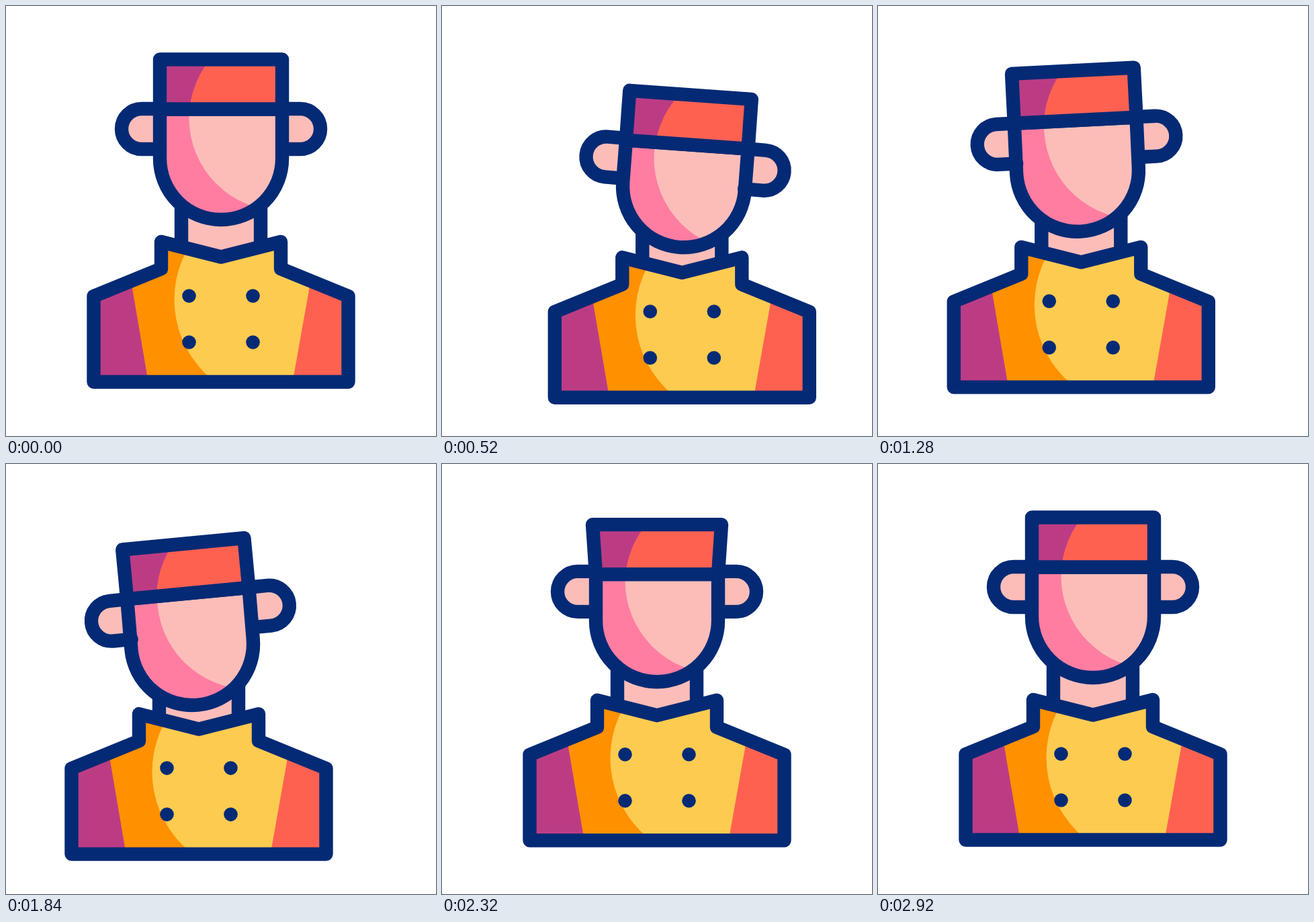
Recreate the animation shown at these times as an HTML page with a canvas. Size 640 px wide and 640 px high, loop 3000 ms.

```html
<!DOCTYPE html>
<html lang="en">
<head>
<meta charset="utf-8">
<title>Bellhop sway</title>
<style>
  html, body { margin: 0; width: 100%; height: 100%; overflow: hidden; background: #fff; }
  canvas { display: block; width: 100vmin; height: 100vmin; }
</style>
</head>
<body>
<canvas id="stage" width="640" height="640"></canvas>
<script>
const ctx = document.getElementById('stage').getContext('2d');
const LOOP = 3000, STEP = 40, MID = 320;
const NAVY = '#042a75', PURPLE = '#bc3c84', CORAL = '#ff6151', SKIN = '#fcbdb8',
      PINK = '#ff7da1', ORANGE = '#ff9000', YELLOW = '#fdcb50';

const easeOut = (t, power) => 1 - (1 - t) ** power;
const smooth = t => t * t * (3 - 2 * t);
const progress = (time, start, end) => Math.min(1, Math.max(0, (time - start) / (end - start)));

// Full lean to either side: tilt in degrees, sink = head drop, press = ears and hat lagging
const RIGHT = { x: 37.3, tilt: 4.1, shift: 0, sink: 18, press: 10.3 };
const LEFT = { x: -36.5, tilt: -6, shift: -7, sink: 22, press: -2 };

function poseAt(time) {
  const right = easeOut(progress(time, 120, 520), 1.5) - progress(time, 720, 1080);
  const left = easeOut(progress(time, 1080, 1640), 1.5) - progress(time, 1800, 2220);
  const bounce = 1.33 * (easeOut(progress(time, 2220, 2420), 2) - smooth(progress(time, 2420, 2920)));

  const side = time < 1080 ? RIGHT : LEFT;
  const lean = time < 1080 ? right : left;
  const crossing = time > 720 && time < 1640;      // the body swings low across the middle
  const body = { x: side.x * lean, y: 23.3 * lean ** (crossing ? 1.5 : 1) + 0.7 * bounce };
  const tilt = side.tilt * lean, press = side.press * lean;
  const headY = body.y + side.sink * lean ** (crossing ? 1.1 : 1);

  // Parts higher above the neck swing further out
  const part = (height, y, angle) => ({
    x: MID + body.x + side.shift * lean + height * Math.sin(tilt * Math.PI / 180),
    y: y + headY,
    angle: angle * Math.PI / 180
  });
  return {
    body,
    face: part(38, 227 + 5.5 * bounce, tilt),
    ears: part(66, 183 + press + 6.2 * bounce, tilt + 0.08 * press),
    hat: part(104, 153.5 + 1.1 * press + 10 * bounce, tilt),
    flare: 5 * bounce
  };
}

function polygon(...points) {
  const path = new Path2D();
  points.forEach(([x, y]) => path.lineTo(x, y));
  path.closePath();
  return path;
}

// Closes a left half with its reflection about the vertical line at axis
const mirrored = (axis, ...half) =>
  polygon(...half, ...half.map(([x, y]) => [2 * axis - x, y]).reverse());

function disc(x, y, r) {
  const path = new Path2D();
  path.arc(x, y, r, 0, 2 * Math.PI);
  return path;
}

function fill(path, color) {
  ctx.fillStyle = color;
  ctx.fill(path);
}

function within({ x, y, angle = 0 }, draw) {
  ctx.save();
  ctx.translate(x, y);
  ctx.rotate(angle);
  draw();
  ctx.restore();
}

function clipped(path, draw) {
  ctx.save();
  ctx.clip(path);
  draw();
  ctx.restore();
}

const torso = mirrored(MID, [MID, 373.5], [231, 351], [231, 391], [130.5, 432], [130.5, 559.5]);
const neck = mirrored(MID, [261, 270], [261, 359], [MID, 373.5]);
const leftSleeve = polygon([184.5, 400], [100, 400], [100, 570], [213.5, 570]);
const rightSleeve = polygon([455, 400], [540, 400], [540, 570], [424.7, 570]);
const ears = ['M-91 -30H-118A30 30 0 0 0 -118 30H-91', 'M91 -30H118A30 30 0 0 1 118 30H91']
  .map(d => new Path2D(d));

function drawBody() {
  fill(neck, SKIN);
  ctx.stroke(new Path2D('M261 270V355M379 270V355'));
  clipped(torso, () => {
    fill(torso, ORANGE);
    fill(disc(404.5, 437, 154), YELLOW);
    fill(leftSleeve, PURPLE);
    fill(rightSleeve, CORAL);
  });
  ctx.stroke(torso);
  for (const x of [272.5, 367.5])
    for (const y of [431.5, 500.5]) fill(disc(x, y, 10.3), NAVY);
}

// The cheeks run from the brow line down to the round chin
function drawFace({ x, y, angle }, brow, light) {
  const dx = 91 * Math.cos(angle), dy = 91 * Math.sin(angle);
  const face = new Path2D();
  face.moveTo(brow.x + dx, brow.y + dy);
  face.arc(x, y, 91, angle, angle + Math.PI);
  face.lineTo(brow.x - dx, brow.y - dy);
  face.closePath();
  clipped(face, () => {
    fill(face, PINK);
    within(light, () => fill(disc(90.5, -16, 138), SKIN));
  });
  ctx.stroke(face);
}

function drawHat(flare) {
  const hat = mirrored(0, [-91, 0], [-91 - flare, -74]);
  clipped(hat, () => {
    fill(hat, PURPLE);
    fill(disc(90.5, 13.5, 138), CORAL);
  });
  ctx.stroke(hat);
}

function render(time) {
  const pose = poseAt(time);
  ctx.fillStyle = '#fff';
  ctx.fillRect(0, 0, 640, 640);
  ctx.strokeStyle = NAVY;
  ctx.lineWidth = 20.4;
  ctx.lineJoin = ctx.lineCap = 'round';

  within(pose.body, drawBody);
  within(pose.ears, () => ears.forEach(ear => fill(ear, SKIN)));
  drawFace(pose.face, pose.hat, pose.ears);
  within(pose.ears, () => ears.forEach(ear => ctx.stroke(ear)));
  within(pose.hat, () => drawHat(pose.flare));
}

function tick() {
  const time = performance.now() % LOOP;
  render(Math.floor(time / STEP) * STEP);
  requestAnimationFrame(tick);
}
tick();
</script>
</body>
</html>
```
